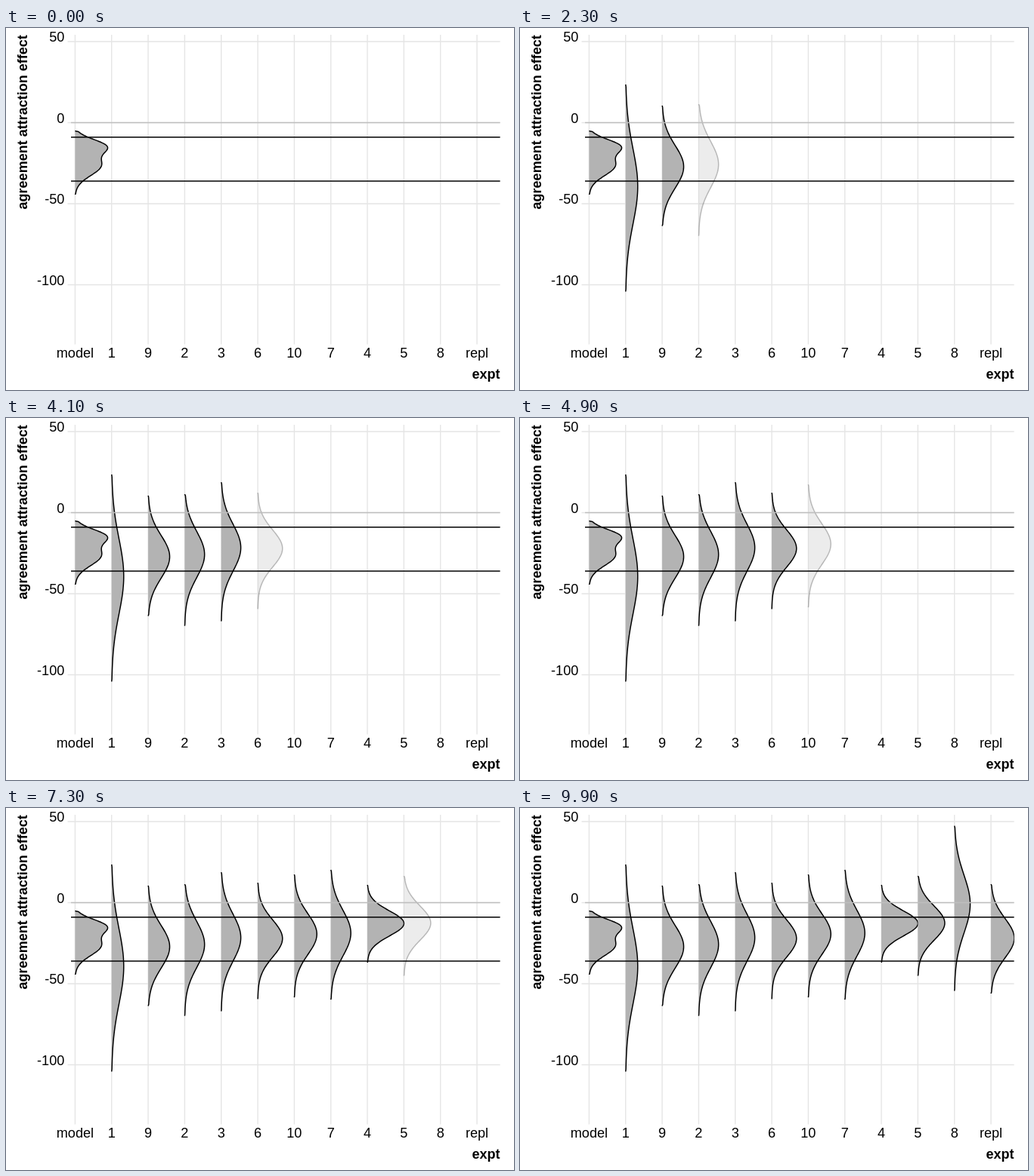
Recreate the animation shown at these times as an HTML page. Size 672 px wide and 480 px high, loop 10 s.

```html
<!DOCTYPE html>
<html lang="en">
<head>
<meta charset="utf-8">
<title>Agreement attraction effect</title>
<style>
  html, body { margin: 0; width: 100%; height: 100%; overflow: hidden; background: #fff; }
  svg { display: block; width: 672px; height: 480px; }
  text { font: 18.1px "Liberation Sans", Arial, sans-serif; }
  .title { font-weight: bold; font-size: 18px; }
  .density { fill: #b3b3b3; stroke: #000; stroke-width: 1.5; stroke-linejoin: round; }
</style>
</head>
<body>
<svg id="plot" viewBox="0 0 672 480">
  <clipPath id="panel"><rect x="86" y="9" width="567.8" height="410.5"/></clipPath>
</svg>
<script>
const LOOP = 10000, FRAME = 100, FADE_FRAMES = 4;
const LEFT = 86, RIGHT = 653.6, TOP = 9, BOTTOM = 419.5, TICK = 4.5;
const GRID = '#e5e5e5', ZERO = '#bebebe', BOUND = '#000';
const AREA = 373;  // peak width in pixels of a normal curve with spread 1
const SAMPLES = 80;
const svg = document.getElementById('plot');

const normal = (mean, sd, share = 1) =>
  v => AREA * share / sd * Math.exp(-0.5 * ((v - mean) / sd) ** 2);
const sum = (f, g) => v => f(v) + g(v);

// Curves of equal area, cut off at the highest and lowest value.
const densities = [
  { name: 'model', high: -5.1, low: -44.4,
    curve: sum(normal(-14.4, 4.3, 0.42), normal(-26.3, 6.3, 0.58)) },
  { name: '1', high: 23.5, low: -104.2, curve: normal(-39.3, 23.3) },
  { name: '9', high: 10.5, low: -63.7, curve: normal(-27.2, 13.1) },
  { name: '2', high: 11.4, low: -69.8, curve: normal(-25.8, 14.2) },
  { name: '3', high: 18.8, low: -67, curve: normal(-21.6, 14.4) },
  { name: '6', high: 12.3, low: -59.5, curve: normal(-22.1, 11.4) },
  { name: '10', high: 17.4, low: -58.4, curve: normal(-19.4, 12.5) },
  { name: '7', high: 20.2, low: -59.8, curve: normal(-18.8, 14.1) },
  { name: '4', high: 10.9, low: -37, curve: normal(-12.8, 7.7) },
  { name: '5', high: 16.5, low: -45.1, curve: normal(-12.6, 10.5) },
  { name: '8', high: 47.4, low: -54.4, curve: normal(-0.9, 17.9) },
  { name: 'repl', high: 11.4, low: -56, curve: normal(-21.9, 12.1) }
];

const colX = i => 91.4 + 48.33 * i;
const valueY = v => 125.5 - 2.15 * v;

function add(tag, attrs, parent = svg) {
  const el = document.createElementNS('http://www.w3.org/2000/svg', tag);
  for (const key in attrs) el.setAttribute(key, attrs[key]);
  parent.appendChild(el);
  return el;
}

function line(x1, y1, x2, y2, stroke) {
  add('line', { x1, y1, x2, y2, stroke, 'stroke-width': stroke === BOUND ? 1.5 : 1.4 });
}

function label(content, attrs) {
  add('text', attrs).textContent = content;
}

// Open path from tip to tip, so the left side is filled but not stroked.
function outline(x, { high, low, curve }) {
  const points = [];
  for (let i = 0; i <= SAMPLES; i++) {
    const v = high + (low - high) * i / SAMPLES;
    const width = i % SAMPLES ? curve(v) : 0;
    points.push((x + width).toFixed(2) + ' ' + valueY(v).toFixed(2));
  }
  return 'M' + points.join('L');
}

for (const v of [50, 0, -50, -100]) {
  line(LEFT - TICK, valueY(v), RIGHT, valueY(v), GRID);
  label(v, { x: 77.3, y: valueY(v) + 0.3, 'text-anchor': 'end' });
}
densities.forEach(({ name }, i) => {
  line(colX(i), TOP, colX(i), BOTTOM, GRID);
  label(name, { x: colX(i), y: 437, 'text-anchor': 'middle' });
});

const layer = add('g', { 'clip-path': 'url(#panel)' });
const shapes = densities.map((density, i) =>
  add('path', { class: 'density', d: outline(colX(i), density) }, layer));

line(LEFT, valueY(0), RIGHT, valueY(0), ZERO);
for (const v of [-9, -36]) line(LEFT, valueY(v), RIGHT, valueY(v), BOUND);

label('expt', { class: 'title', x: 653.5, y: 465, 'text-anchor': 'end' });
label('agreement attraction effect', {
  class: 'title', transform: 'translate(28 240.4) rotate(-90)'
});

// Each density fades in over four steps and then stays until the loop restarts.
function render(time) {
  const frame = Math.floor((time % LOOP) / FRAME);
  shapes.forEach((shape, i) => {
    const start = 8 * i - 4 + Math.min(i, 5);
    const alpha = i ? Math.max(0, Math.min(1, (frame - start + 1) / FADE_FRAMES)) : 1;
    shape.setAttribute('fill-opacity', alpha);
    shape.setAttribute('stroke-opacity', alpha);
  });
}

const began = performance.now();
function tick() {
  render(performance.now() - began);
  requestAnimationFrame(tick);
}
tick();
</script>
</body>
</html>
```
